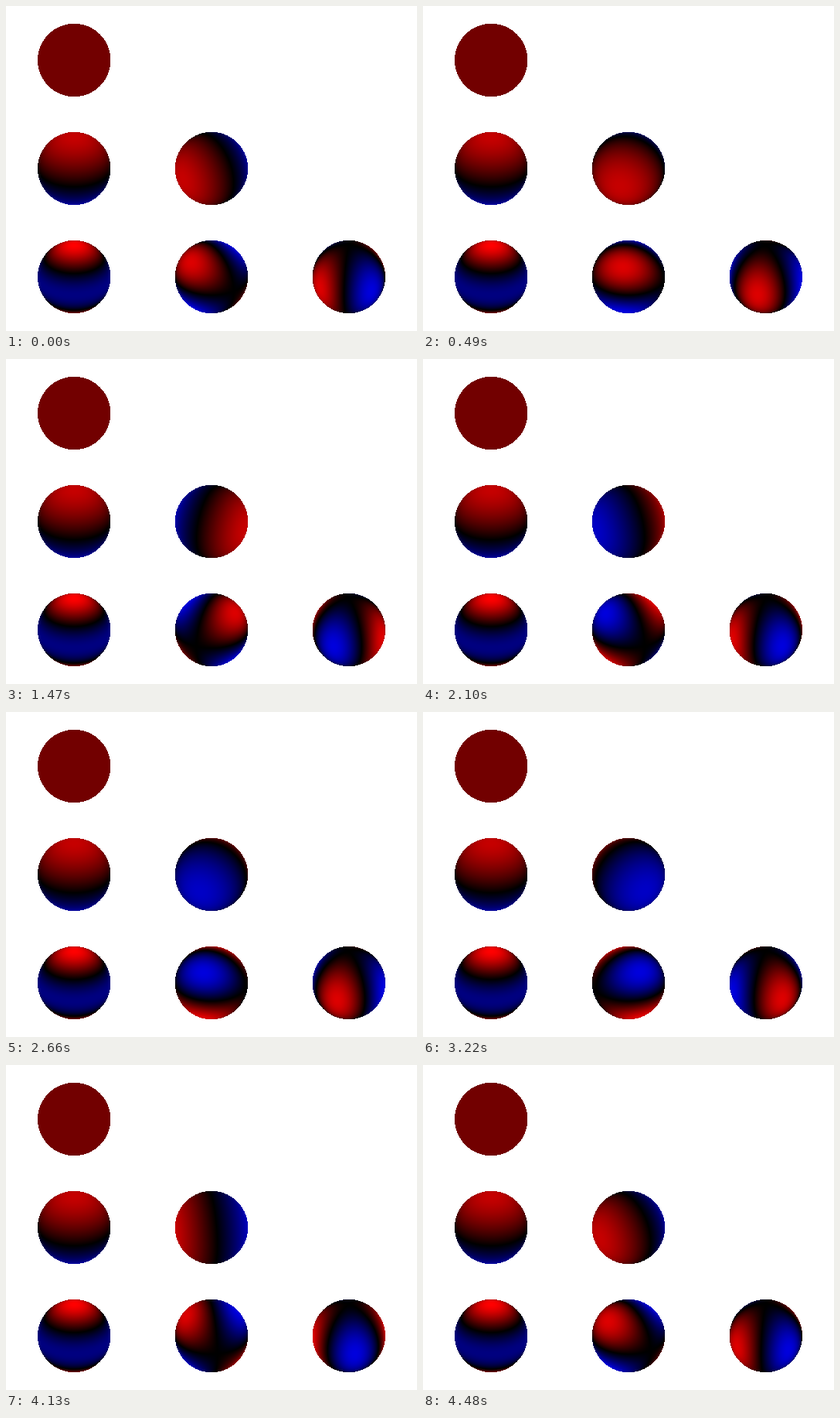
Recreate the animation shown at these times as an HTML page with a canvas. Size 532x420 px, loop 4550 ms.

```html
<!DOCTYPE html>
<html lang="en">
<head>
<meta charset="utf-8">
<title>Spherical harmonics</title>
<style>
  html, body { margin: 0; width: 532px; height: 420px; overflow: hidden; background: #fff; }
  canvas { display: block; }
</style>
</head>
<body>
<canvas id="stage" width="532" height="420"></canvas>
<script>
const ctx = document.getElementById("stage").getContext("2d");
const STEP_MS = 70, STEPS = 65;
const RADIUS = 47.2, SIZE = 98;
const ELEVATION = Math.PI / 6;
const VIEW_LON = 232.5 * Math.PI / 180;
const PEAK = Math.sqrt(5 / (4 * Math.PI));

// Real harmonics: part that depends on height z and on s = sqrt(1 - z²)
const c = k => Math.sqrt(k / Math.PI);
const harmonics = [
  { l: 0, m: 0, f: () => c(1 / 4) },
  { l: 1, m: 0, f: z => c(3 / 4) * z },
  { l: 1, m: 1, f: (z, s) => -c(3 / 4) * s },
  { l: 2, m: 0, f: z => c(5 / 16) * (3 * z * z - 1) },
  { l: 2, m: 1, f: (z, s) => -c(15 / 4) * z * s },
  { l: 2, m: 2, f: (z, s) => c(15 / 16) * s * s }
];

function makeBall({ l, m, f }) {
  const cx = 266 + (m - 1) * 177.75, cy = 70 + l * 140;
  const left = Math.floor(cx) - SIZE / 2, top = cy - SIZE / 2;
  const image = ctx.createImageData(SIZE, SIZE);
  const points = [];
  const sinE = Math.sin(ELEVATION), cosE = Math.cos(ELEVATION);
  for (let y = 0; y < SIZE; y++) {
    for (let x = 0; x < SIZE; x++) {
      const u = (left + x + 0.5 - cx) / RADIUS;
      const v = (cy - top - y - 0.5) / RADIUS;
      const rest = 1 - u * u - v * v;
      if (rest < 0) continue;
      const d = Math.sqrt(rest);
      const z = v * cosE + d * sinE;
      const lon = VIEW_LON + Math.atan2(u, d * cosE - v * sinE);
      const i = 4 * (y * SIZE + x);
      image.data[i + 3] = 255;
      points.push({ i, lon, amp: f(z, Math.sqrt(Math.max(0, 1 - z * z))) / PEAK });
    }
  }
  return { m, left, top, image, points };
}

function drawBall({ m, left, top, image, points }, turn) {
  for (const { i, lon, amp } of points) {
    const value = 255 * amp * Math.cos(m * (lon - turn));
    image.data[i] = Math.max(0, value);
    image.data[i + 2] = Math.max(0, -value);
  }
  ctx.putImageData(image, left, top);
}

const balls = harmonics.map(makeBall);
let shown = -1;

function frame(now) {
  const step = Math.floor(now / STEP_MS) % STEPS;
  if (step !== shown) {
    const turn = 2 * Math.PI * step / (STEPS - 1);
    for (const ball of balls) if (ball.m || shown < 0) drawBall(ball, turn);
    shown = step;
  }
  requestAnimationFrame(frame);
}

ctx.fillStyle = "#fff";
ctx.fillRect(0, 0, 532, 420);
const start = performance.now();
(function tick() { frame(0); })();
</script>
</body>
</html>
```
